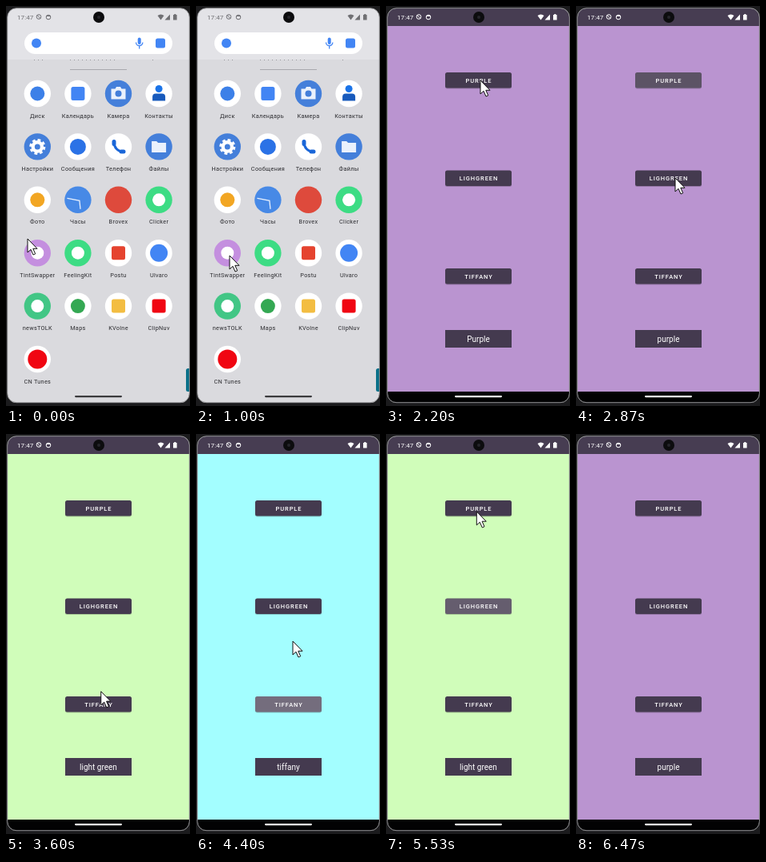
An HTML page that plays this animation: 230x500 px, repeating every 6590 ms.

```html
<!DOCTYPE html>
<html lang="ru">
<head>
<meta charset="utf-8">
<title>Phone</title>
<style>
  html, body { margin: 0; width: 100%; height: 100%; overflow: hidden; background: #1b1b1d; }
  svg { display: block; width: 230px; height: 500px; }
  text { font-family: Roboto, sans-serif; }
  #icons text { font-size: 7.3px; letter-spacing: .3px; fill: #2b2b2f; text-anchor: middle; }
  #buttons text { font-size: 7.5px; font-weight: 500; letter-spacing: .9px; fill: #fff; text-anchor: middle; }
</style>
</head>
<body>
<svg viewBox="0 0 230 500">
  <clipPath id="screen"><rect x="2" y="3" width="227" height="493" rx="11"/></clipPath>
  <rect width="230" height="500" fill="#1b1b1d"/>
  <g clip-path="url(#screen)">
    <g id="home">
      <rect width="230" height="500" fill="#dadade"/>
      <rect width="230" height="67" fill="#e3e3e7"/>
      <rect x="23" y="33" width="185" height="27" rx="13.5" fill="#fff"/>
      <circle cx="38" cy="46.5" r="6" fill="#4285f4"/>
      <rect x="164.700" y="39.500" width="4" height="8.500" rx="2" fill="#4285f4"/>
      <path d="M162.500 45.500a4.200 4.200 0 0 0 8.400 0M166.700 50v3.500" fill="none" stroke="#4285f4" stroke-width="1.300"/>
      <rect x="187" y="40.500" width="12" height="12" rx="2.500" fill="#4285f4"/>
      <path d="M35 67.500h11M80 67.500h56M183 67.500h5" stroke="#77777b" stroke-width=".7" stroke-dasharray="1 4"/>
      <path d="M80 79.500h71" stroke="#a9a9ae"/>
      <g id="icons"></g>
      <rect x="225" y="453" width="8" height="29" rx="2.500" fill="#087089"/>
      <rect x="86" y="487" width="59" height="2.200" rx="1.100" fill="#3a3a3d"/>
    </g>
    <g id="app">
      <rect id="page" y="24" width="230" height="459"/>
      <rect width="230" height="25" fill="#473d52"/>
      <rect y="482" width="230" height="30" fill="#020203"/>
      <g id="buttons"></g>
      <rect x="74" y="405" width="83" height="22" fill="#443a4f"/>
      <text id="label" x="115.500" y="420" font-size="10" fill="#fff" text-anchor="middle"></text>
      <rect id="handle" x="86" y="487" width="59" height="2.200" rx="1.100" fill="#f2f2f2"/>
    </g>
    <g id="status">
      <text x="14" y="17" font-size="8" letter-spacing=".1">17:47</text>
      <g fill="none" stroke="currentColor">
        <circle cx="41" cy="13.500" r="2.800"/><path d="M39 11.500l4 4"/>
        <circle cx="53" cy="14" r="2.800"/><path d="M50 12.500h6"/>
      </g>
      <path fill="currentColor" d="M189.500 12q4-3.200 8 0l-4 5.500zM198.500 17.500h6.500v-7zM209 11h1.300v-1h2v1h1.300v6.500h-4.600z"/>
    </g>
    <circle cx="116" cy="14" r="7" fill="#0c0c0e"/>
    <circle cx="116" cy="14" r="2" fill="#25252b"/>
  </g>
  <rect x="1.700" y="2.700" width="227.600" height="493" rx="11.300" fill="none" stroke="#929294"/>
  <path id="cursor" d="M0 0V17L4 13.300 7 20 9.700 18.800 6.800 12.300H12Z" fill="#fff" stroke="#111" stroke-linejoin="round"/>
</svg>
<script>
const $ = id => document.getElementById(id);
const LOOP = 6590, STEP = 200 / 3;
const PURPLE = '#ba94d0', GREEN = '#d0fdba', CYAN = '#a3feff';
const BLUE = '#447fda', WHITE = '#fff';

const dot = (color, r = 9) => `<circle r="${r}" fill="${color}"/>`;
const square = (color, s = 17) => `<rect x="${-s / 2}" y="${-s / 2}" width="${s}" height="${s}" rx="2.5" fill="${color}"/>`;
const fill = (d, color) => `<path d="${d}" fill="${color}"/>`;
const line = (d, color, w) => `<path d="${d}" fill="none" stroke="${color}" stroke-width="${w}" stroke-linecap="round"/>`;

const icons = [
  ['Диск', WHITE, dot('#3c80e8')],
  ['Календарь', WHITE, square('#4285f4')],
  ['Камера', BLUE, fill('M-9-6h5l1.500-2.500h5L4-6h5V7H-9z', '#eaf1fc') + dot(BLUE, 4)],
  ['Контакты', WHITE, '<circle cy="-6" r="4.500" fill="#1a73e8"/>' + fill('M-8 9V4q0-4 4-4h8q4 0 4 4v5z', '#185abc')],
  ['Настройки', BLUE, '<circle r="8.500" fill="none" stroke="#fff" stroke-width="3" stroke-dasharray="3.700 2.975"/>' + dot(WHITE, 7.8) + dot(BLUE, 3.5)],
  ['Сообщения', WHITE, dot('#2b72e6', 10)],
  ['Телефон', WHITE, line('M-5.500-6C-5.500 1-1 6 6 6', '#1a66d8', 3) + line('M-5.500-6.500v3M3.500 6h3', '#1a66d8', 5)],
  ['Файлы', BLUE, fill('M-9-7h6l2 2H9V7H-9z', '#eaf1fc')],
  ['Фото', WHITE, dot('#f2a623')],
  ['Часы', '#4789e6', line('M-13-2L2 1 3 11', '#e8f0fd', 1.3)],
  ['Brovex', '#de4a3c', ''],
  ['Clicker', '#3ddc84', dot(WHITE, 8)],
  ['TintSwapper', '#c48fdf', dot(WHITE, 8)],
  ['FeelingKit', '#3ddc84', dot(WHITE, 8)],
  ['Postu', WHITE, square('#e5432f')],
  ['Ulvaro', WHITE, dot('#4285f4', 11)],
  ['newsTOLK', '#42c685', dot(WHITE, 8)],
  ['Maps', WHITE, dot('#34a853')],
  ['KVolne', WHITE, square('#f3bd42')],
  ['ClipNuv', WHITE, square('#f00612')],
  ['CN Tunes', WHITE, dot('#f00612', 12)],
];
$('icons').innerHTML = icons.map(([name, disc, mark], i) =>
  `<g transform="translate(${39.3 + i % 4 * 50.6} ${109.5 + (i >> 2) * 66.4})">
    ${dot(disc, 16.7)}${mark}<text y="30">${name}</text></g>`).join('');

$('buttons').innerHTML = [['PURPLE', 83], ['LIGHGREEN', 205.5], ['TIFFANY', 328]].map(([name, y]) => {
  const box = (dy, color) => `<rect x="74" y="${y + dy}" width="83" height="19.500" rx="2.500" fill="${color}"/>`;
  return box(1, '#0003') + box(0, '#443a4f') + box(0, WHITE) + `<text x="116" y="${y + 12.7}">${name}</text>`;
}).join('');
const ripples = [...document.querySelectorAll('#buttons rect:nth-of-type(3n)')];

// [time, button, page colour, label]
const taps = [
  [2500, 0, PURPLE, 'purple'],
  [3000, 1, GREEN, 'light green'],
  [4120, 2, CYAN, 'tiffany'],
  [5133, 1, GREEN, 'light green'],
  [5660, 0, PURPLE, 'purple'],
];

// [time, x, y]
const path = [
  [0, 27, 291], [800, 42, 312], [1110, 42, 312], [1400, 128, 240], [1500, 128, 240],
  [2050, 118, 93], [2560, 118, 93], [2860, 124, 215], [3070, 124, 215],
  [3750, 118, 337], [4170, 118, 337], [4400, 121, 259], [4650, 122, 215],
  [5190, 122, 215], [5500, 113, 93], [5800, 113, 93], [6350, 122, 506], [LOOP, 122, 506],
];

const clamp = v => Math.min(1, Math.max(0, v));
const ramp = (t, a, b) => clamp((t - a) / (b - a));

function cursorAt(t) {
  const i = path.findIndex(k => k[0] > t);
  const [t0, x0, y0] = path[i - 1], [t1, x1, y1] = path[i];
  const u = ramp(t, t0, t1), e = u * u * (3 - 2 * u);
  return [x0 + (x1 - x0) * e, y0 + (y1 - y0) * e];
}

function draw(t) {
  const rest = (1 - ramp(t, 1100, 1450)) ** 3;
  $('app').setAttribute('transform', `translate(${22 * rest} ${292 * rest}) scale(${1 - .85 * rest})`);
  $('app').setAttribute('opacity', ramp(t, 1100, 1200));
  const ink = t < 1200 ? '#707074' : WHITE;
  $('status').setAttribute('color', ink);
  $('status').setAttribute('fill', ink);
  $('handle').setAttribute('opacity', ramp(t, 1500, 1750));

  const last = taps.filter(k => k[0] <= t).pop() || [0, 0, PURPLE, 'Purple'];
  $('page').setAttribute('fill', last[2]);
  $('label').textContent = last[3];
  ripples.forEach((r, i) => r.setAttribute('opacity', Math.max(...taps.map(([at, b]) =>
    b === i ? .38 * ramp(t, at, at + 150) * (1 - ramp(t, at + 200, at + 450)) : 0))));

  $('cursor').setAttribute('transform', `translate(${cursorAt(t)})`);
}

const start = performance.now();
function tick() {
  const t = (performance.now() - start) % LOOP;
  draw(Math.floor((t + 1) / STEP) * STEP);
  requestAnimationFrame(tick);
}
tick();
</script>
</body>
</html>
```
